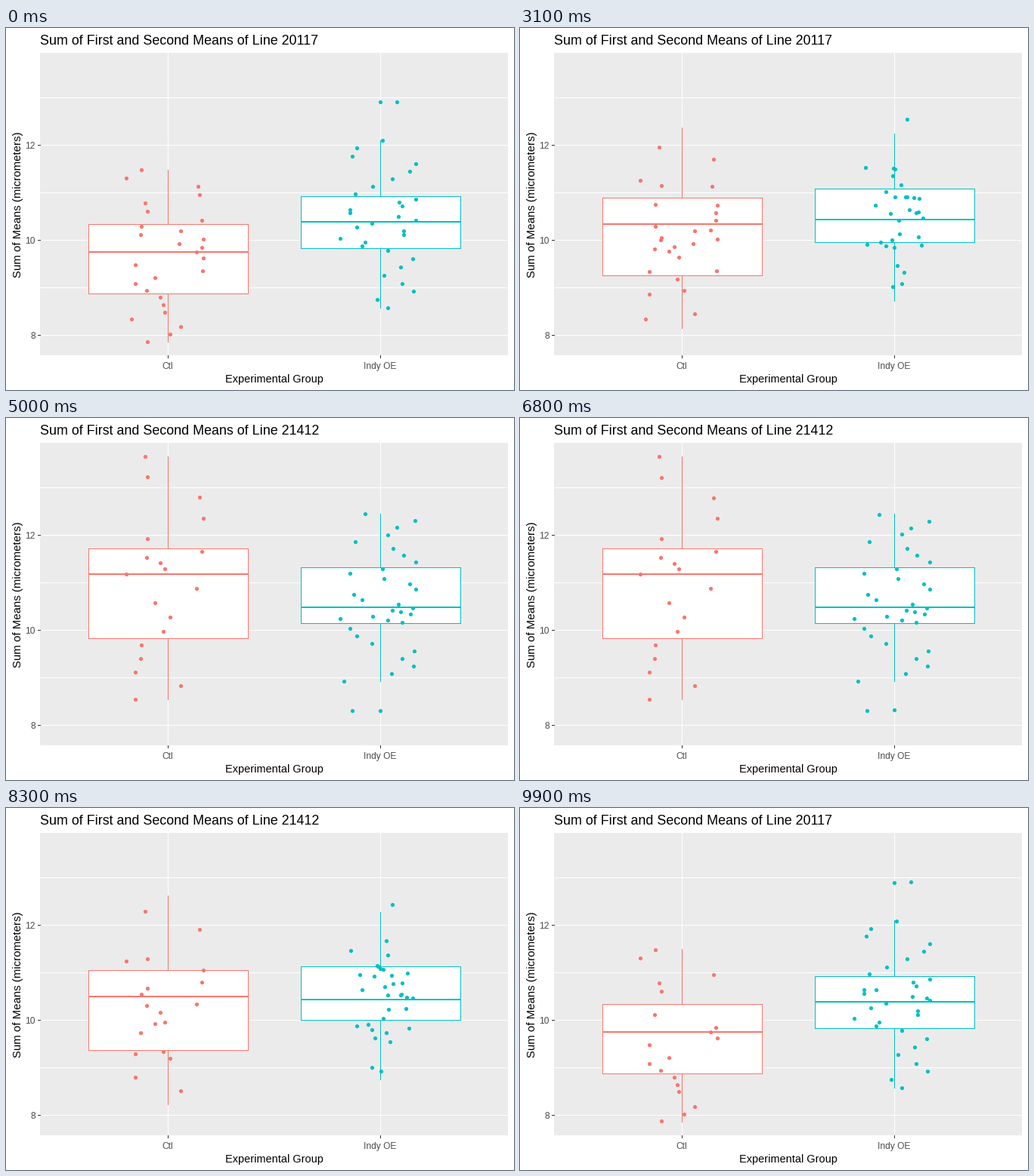
Write a matplotlib script that moves like this. It is 672 by 480 pixels and loops after 10 s.

```python
import numpy as np
import matplotlib.pyplot as plt
from matplotlib.animation import FuncAnimation
from matplotlib.patches import Rectangle

W, H, DPI = 672, 480, 96
FRAMES, INTERVAL = 100, 100
LEAVE_A, REACH_B, LEAVE_B = 16, 50, 67
RED, TEAL = "#F8766D", "#00BFC4"
LINES = ("20117", "21412")
CTL_X, INDY_X = 214, 495

# Largest, upper quartile, median, lower quartile, smallest, per line
CTL_STATS = np.array([(11.48, 10.33, 9.75, 8.87, 7.86),
                      (13.65, 11.71, 11.17, 9.82, 8.54)])
INDY_STATS = np.array([(12.09, 10.92, 10.38, 9.82, 8.57),
                       (12.44, 11.32, 10.48, 10.15, 8.92)])
INDY_OUTLIER = (12.9, 8.3)
CTL_ROWS, INDY_ROWS = (27, 19), (31, 33)

rng = np.random.default_rng(12)


def px(n):
    return n * 72 / DPI


def mix(a, b, p):
    return a + (b - a) * p


def ease(u):
    return (1 - np.cos(np.pi * u)) / 2


def y_of(value):
    return 155 + (12 - np.asarray(value)) * 63


def sample(n, stats, *outliers):
    """Shuffled values whose five-number summary is stats."""
    ranks = np.linspace(0, 1, n - len(outliers))
    values = np.interp(ranks, np.linspace(0, 1, 5), stats)
    return y_of(rng.permutation(np.append(values, outliers)))


# Each data row keeps its jitter, so a shorter control group shifts the other
jitter = rng.uniform(-55, 53, sum(CTL_ROWS) + sum(INDY_ROWS))
ctl, indy = [], []
for i in range(2):
    n, m = CTL_ROWS[i], INDY_ROWS[i]
    ctl.append(np.column_stack([CTL_X + jitter[:n], sample(n, CTL_STATS[i])]))
    indy.append(np.column_stack([INDY_X + jitter[n:n + m],
                                 sample(m, INDY_STATS[i], INDY_OUTLIER[i])]))

plt.rcParams["font.family"] = "Liberation Sans"
fig = plt.figure(figsize=(W / DPI, H / DPI), dpi=DPI, facecolor="white")
ax = fig.add_axes([0, 0, 1, 1])
ax.set_xlim(0, W)
ax.set_ylim(H, 0)
ax.axis("off")


def line(xs, ys, color, width=1, z=1):
    return ax.plot(xs, ys, color=color, lw=px(width), zorder=z,
                   antialiased=False, solid_capstyle="butt")[0]


def label(x, y, text, size, color="black", ha="center", **kw):
    return ax.text(x, y, text, fontsize=px(size), color=color, ha=ha,
                   va="baseline", **kw)


def dots(color, z):
    return ax.scatter([], [], s=px(5.2) ** 2, color=color, linewidths=0,
                      antialiased=False, zorder=z)


class Box:
    def __init__(self, x, color):
        self.whiskers = [line([x, x], [0, 0], color, z=3) for _ in range(2)]
        self.rect = Rectangle((x - 105, 0), 211, 1, fc="white", ec=color,
                              lw=px(1), antialiased=False, zorder=4)
        ax.add_patch(self.rect)
        self.median = line([x - 105, x + 106], [0, 0], color, 2, z=5)

    def place(self, stats):
        high, top, mid, bottom, low = y_of(stats)
        self.whiskers[0].set_ydata([high, top])
        self.whiskers[1].set_ydata([bottom, low])
        self.rect.set_y(top)
        self.rect.set_height(bottom - top)
        self.median.set_ydata([mid, mid])


# Panel, grid and axes
ax.add_patch(Rectangle((45, 33), 619, 401, fc="#EBEBEB", lw=0,
                       antialiased=False, zorder=0))
for value in range(8, 14):
    y = y_of(value)
    line([45, 664], [y, y], "white")
    if value % 2 == 0:
        line([42, 45], [y, y], "#333333")
        label(39, y + 5, str(value), 12, "#4D4D4D", ha="right")
for x, name in ((CTL_X, "Ctl"), (INDY_X, "Indy OE")):
    line([x, x], [33, 434], "white")
    line([x, x], [434, 437], "#333333")
    label(x, 452, name, 12, "#4D4D4D")
label(354.5, 470, "Experimental Group", 14.5)
label(20, 234.5, "Sum of Means (micrometers)", 15, rotation=90,
      rotation_mode="anchor")
title = label(45, 22, "", 17.9, ha="left")

ctl_box = Box(CTL_X, RED)
indy_box = Box(INDY_X, TEAL)
outlier = dots(TEAL, 2)
ctl_dots = dots(RED, 6)
indy_dots = dots(TEAL, 6)


def travel(a, b, p, forward):
    """Paired rows move; rows with no partner wait where they started."""
    n = min(len(a), len(b))
    rest = a[n:] if forward else b[n:]
    return np.vstack([mix(a[:n], b[:n], p), rest])


def update(f):
    forward = f < REACH_B
    if forward:
        u = max(0, (f - LEAVE_A) / (REACH_B - LEAVE_A))
    else:
        u = 1 - max(0, (f - LEAVE_B) / (FRAMES - LEAVE_B))
    p = ease(u)

    title.set_text("Sum of First and Second Means of Line " + LINES[int(u >= 0.5)])
    ctl_box.place(mix(*CTL_STATS, p))
    indy_box.place(mix(*INDY_STATS, p))
    outlier.set_offsets([(INDY_X, y_of(mix(*INDY_OUTLIER, p)))])
    ctl_dots.set_offsets(travel(*ctl, p, forward))
    indy_dots.set_offsets(travel(*indy, p, forward))
    return ()


anim = FuncAnimation(fig, update, frames=FRAMES, interval=INTERVAL,
                     repeat=True, repeat_delay=0, blit=False)
plt.show()
```
